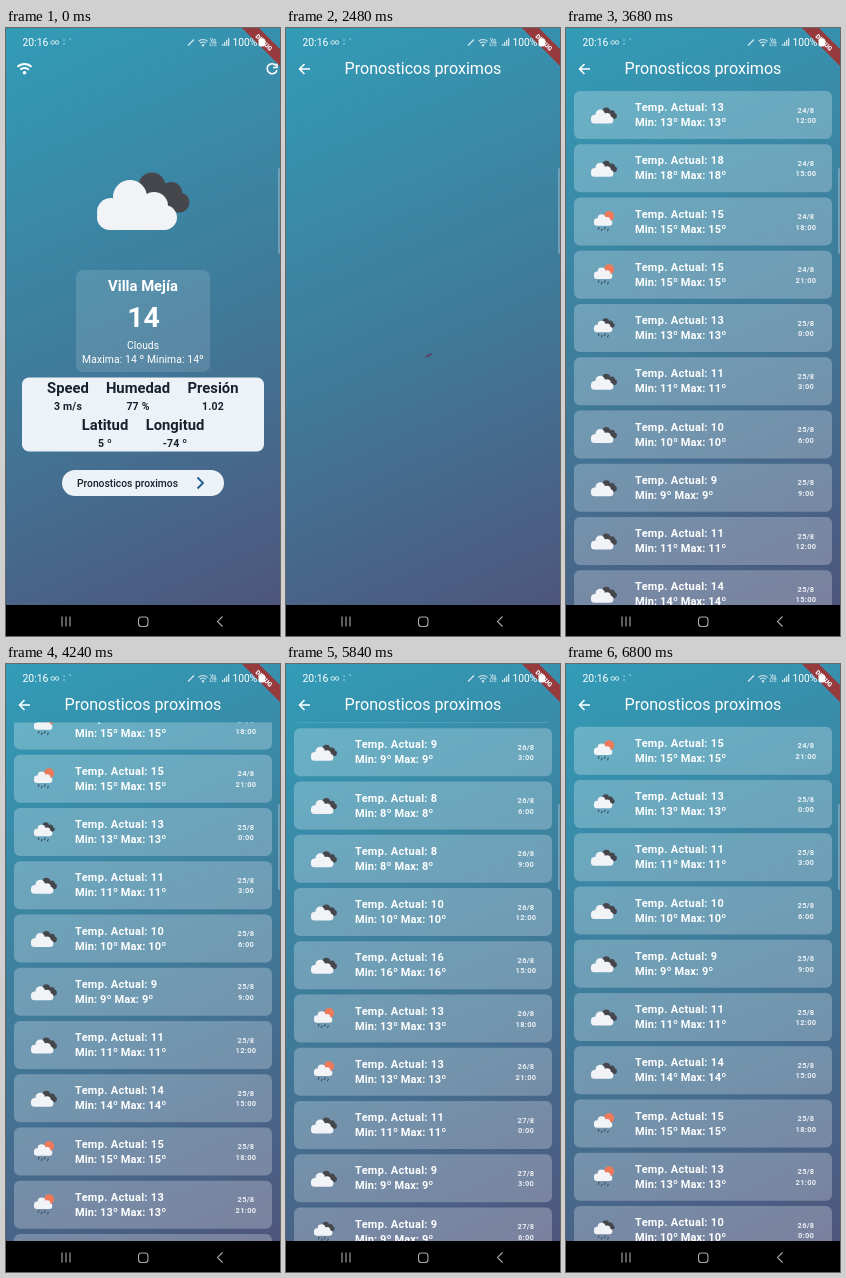
Write an HTML page with a canvas that moves like this. It is 274 px wide and 608 px high and loops after 6.88 s.

```html
<!DOCTYPE html>
<html lang="es">
<head>
<meta charset="utf-8">
<title>Pronosticos proximos</title>
<style>
html, body { margin: 0; width: 100%; height: 100%; overflow: hidden; background: #000; }
canvas { display: block; }
</style>
</head>
<body>
<canvas id="stage" width="274" height="608"></canvas>
<script>
const c = document.getElementById('stage').getContext('2d');
const LOOP = 6880, STEP = 80, PITCH = 53.25, FLOOR = 577;
const OPEN = 1040, OPENED = 1360, LOADED = 2640;

// One entry per three hours, starting 24/8 12:00
const temps = [13, 18, 15, 15, 13, 11, 10, 9, 11, 14, 15, 13, 10, 9, 8, 8, 10, 16, 13, 13, 11, 9, 9, 8];
// c: clouds, s: rain with sun, r: rain
const skies = 'ccssrcccccssrcccccssccrc';
// time, scroll offset, speed
const scrollKeys = [[3680, 0, 0], [4240, 132, .34], [5040, 423, .35],
  [5840, 691, .12], [6000, 700, 0], [6800, 160, -.4]];

function text(str, x, y, size, weight = 400, align = 'left', color = '#fff', spacing = 0) {
  c.font = `${weight} ${size}px Roboto, sans-serif`;
  c.letterSpacing = spacing + 'px';
  c.textAlign = align;
  c.fillStyle = color;
  c.fillText(str, x, y);
}

function box(x, y, w, h, r, color) {
  c.fillStyle = color;
  c.beginPath();
  c.roundRect(x, y, w, h, r);
  c.fill();
}

function disc(x, y, r, color) {
  c.fillStyle = color;
  c.beginPath();
  c.arc(x, y, r, 0, 7);
  c.fill();
}

function stroke(d, color = '#fff', width = 1.5) {
  c.strokeStyle = color;
  c.lineWidth = width;
  c.stroke(new Path2D(d));
}

function at(x, y, scale, draw) {
  c.save();
  c.translate(x, y);
  c.scale(scale, scale);
  draw();
  c.restore();
}

function cloud(color) {
  box(-40, 3, 80, 25, 12.5, color);
  disc(-26, 10, 14, color);
  disc(-7, -5, 17, color);
  disc(17, 4, 14, color);
}

function weather(kind) {
  if (kind === 'c') {
    at(14, -11, .8, () => cloud('#45474d'));
    at(-6.5, 1, 1, () => cloud('#f1f3f6'));
    return;
  }
  if (kind === 's') disc(18, -21, 18, '#ee7a5b');
  else at(11, -22, .68, () => cloud('#45474d'));
  at(-3, -10, .82, () => cloud('#f1f3f6'));
  for (let i = 0; i < 4; i++) {
    const x = -17 + i * 11, y = 18 + i % 2 * 5;
    stroke(`M${x} ${y}l-4 9`, '#3e5468', 4);
  }
}

function background() {
  const g = c.createLinearGradient(0, 0, 274, 608);
  g.addColorStop(0, '#329cb7');
  g.addColorStop(.55, '#417797');
  g.addColorStop(1, '#4f5279');
  c.fillStyle = g;
  c.fillRect(0, 0, 274, FLOOR);
}

function fan(x, y, r, width) {
  c.strokeStyle = '#fff';
  c.lineWidth = width;
  for (const k of [1, .6]) {
    c.beginPath();
    c.arc(x, y, r * k, -2.35, -.79);
    c.stroke();
  }
  disc(x, y - r * .12, r * .18, '#fff');
}

function home() {
  fan(18.5, 46, 10, 1.8);
  stroke('M270 37.5A5 5 0 1 0 271 42M271 35.5V39.5H267', '#fff', 1.6);
  at(137.5, 173, 1, () => weather('c'));

  box(70, 242, 134, 102, 7, 'rgba(255,255,255,.13)');
  text('Villa Mejía', 137, 263, 14.8, 700, 'center');
  text('14', 137.5, 299, 28.5, 700, 'center');
  text('Clouds', 137, 321, 10.35, 400, 'center');
  text('Maxima: 14 º Minima: 14º', 137, 335, 10.35, 400, 'center', '#fff', .1);

  box(16, 349.5, 242, 74, 7, '#ecf2f7');
  const facts = [['Speed', '3 m/s', 62, 365], ['Humedad', '77 %', 132, 365], ['Presión', '1.02', 207, 365],
    ['Latitud', '5 º', 99, 402], ['Longitud', '-74 º', 169, 402]];
  for (const [label, value, x, y] of facts) {
    text(label, x, y, 14.8, 700, 'center', '#18222c');
    text(value, x, y + 16.5, 10.5, 700, 'center', '#18222c', .2);
  }

  box(56, 442, 162, 26, 13, '#ecf2f7');
  text('Pronosticos proximos', 71, 458.5, 10.3, 500, 'left', '#18222c');
  stroke('M191.5 449.5l5.5 5.5l-5.5 5.5', '#1f5f8d', 1.8);
}

function row(i, y) {
  const hour = 12 + i * 3, temp = temps[i];
  box(8, y, 258, 48, 6, 'rgba(255,255,255,.25)');
  at(38, y + 24.5, .28, () => weather(skies[i]));
  text(`Temp. Actual: ${temp}`, 69, y + 20, 11, 700, 'left', '#fff', .3);
  text(`Min: ${temp}º Max: ${temp}º`, 69, y + 35.2, 11, 700, 'left', '#fff', .1);
  const faint = 'rgba(255,255,255,.85)';
  text(`${24 + Math.floor(hour / 24)}/8`, 240, y + 21.7, 7.5, 700, 'center', faint, .3);
  text(`${hour % 24}:00`, 240, y + 32, 7.5, 700, 'center', faint, .3);
}

function scrollAt(t) {
  if (t <= scrollKeys[0][0]) return 0;
  const n = scrollKeys.findIndex(k => k[0] >= t);
  const [t0, s0, v0] = scrollKeys[n - 1], [t1, s1, v1] = scrollKeys[n];
  const d = t1 - t0, u = (t - t0) / d, w = 1 - u;
  return s0 * w * w * (1 + 2 * u) + s1 * u * u * (3 - 2 * u) + d * u * w * (v0 * w - v1 * u);
}

function spinner(t) {
  const ms = t + 2852, phase = ms % 1333 / 1333;
  const ease = x => { x = Math.min(1, Math.max(0, x)); return x * x * (3 - 2 * x); };
  const head = ease(phase * 2), tail = ease(phase * 2 - 1);
  const start = Math.PI * (-.5 + 1.5 * tail + .5 * phase + 2 * ms / 2222);
  c.strokeStyle = '#594a69';
  c.lineWidth = 2.4;
  c.beginPath();
  c.arc(137, 317, 12, start - .15, start + Math.max(.4, (head - tail) * 1.5 * Math.PI));
  c.stroke();
}

function forecast(t) {
  stroke('M24 41H14M18.5 36l-5 5l5 5', '#fff', 1.6);
  text('Pronosticos proximos', 58.5, 46, 16.1);
  if (t < LOADED) return spinner(t);
  c.save();
  c.beginPath();
  c.rect(0, 58.5, 274, FLOOR - 58.5);
  c.clip();
  const offset = scrollAt(t);
  temps.forEach((_, i) => {
    const y = 63 + i * PITCH - offset;
    if (y > 0 && y < FLOOR) row(i, y);
  });
  c.restore();
}

function system() {
  text('20:16', 16.5, 18, 10.4);
  c.globalAlpha = .75;
  c.strokeStyle = '#fff';
  c.lineWidth = 1;
  for (const x of [46.7, 51]) {
    c.beginPath();
    c.arc(x, 14.5, 1.8, 0, 7);
    c.stroke();
  }
  for (const [x, y] of [[58, 12], [58, 16], [64, 11]]) disc(x, y, .7, '#fff');
  stroke('M182 17.5l6-6', '#fff', 1.4);
  fan(197, 18, 6.5, 1.2);
  text('Vo', 204, 13.5, 5, 700);
  text('LTE', 203.5, 18, 4.5, 700);
  for (let i = 0; i < 4; i++) box(216 + i * 2, 16 - i * 2, 1.3, 2 + i * 2, 0, '#fff');
  c.globalAlpha = 1;
  text('100%', 226.5, 18, 10.3);

  c.fillStyle = '#963a3e';
  c.fill(new Path2D('M236 0H253L274 21V38Z'));
  c.save();
  c.translate(258.5, 14);
  c.rotate(Math.PI / 4);
  text('DEBUG', 0, 3, 6.5, 900, 'center');
  c.restore();
  box(252.5, 10.5, 6.5, 8, 2, '#fff');

  box(272, 140, 3, 86, 1.5, 'rgba(190,208,220,.4)');

  c.fillStyle = '#000';
  c.fillRect(0, FLOOR, 274, 31);
  stroke('M56 588.5v10M60 588.5v10M64 588.5v10M216.5 588.5l-5 5l5 5', '#aaa', 1.1);
  c.beginPath();
  c.roundRect(132.5, 589, 9.5, 9.5, 3);
  c.stroke();
}

function frame(now) {
  const t = Math.floor(now % LOOP / STEP) * STEP;
  const shown = Math.min(1, Math.max(0, (t - OPEN) / (OPENED - OPEN)));
  background();
  if (shown < 1) {
    c.globalAlpha = 1 - shown;
    home();
  }
  if (shown > 0) {
    c.globalAlpha = shown;
    forecast(t);
  }
  c.globalAlpha = 1;
  system();
}

let begin;
function tick(now) {
  begin ??= now;
  frame(now - begin);
  requestAnimationFrame(tick);
}
requestAnimationFrame(tick);
</script>
</body>
</html>
```
